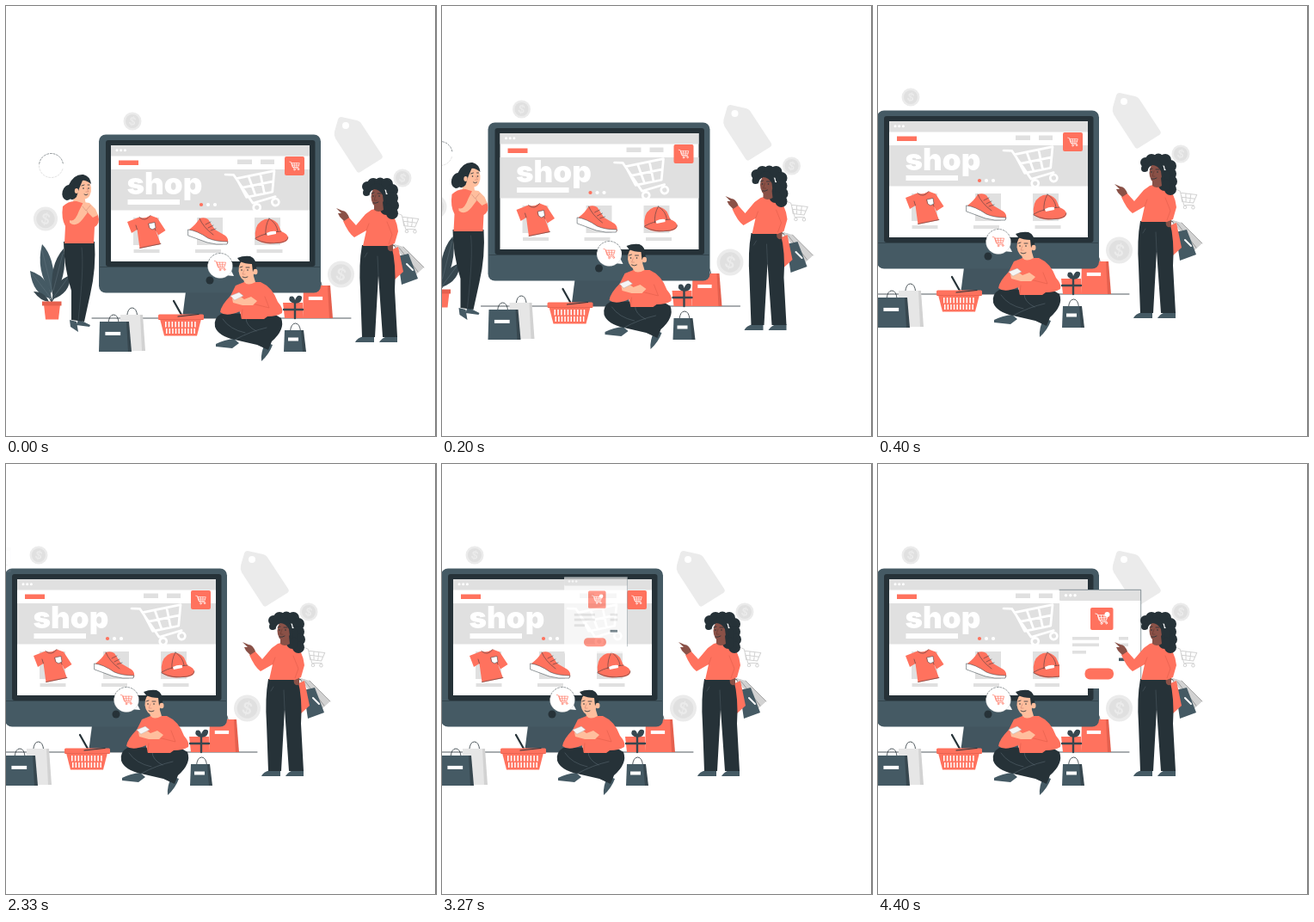
An HTML page with a canvas that plays this animation: 500x500 px, repeating every 8070 ms.

```html
<!DOCTYPE html>
<html lang="en">
<head>
<meta charset="utf-8">
<title>Online shop</title>
<style>
html, body { margin: 0; width: 100%; height: 100%; overflow: hidden; background: #fff; }
canvas { display: block; width: 100vw; height: 100vh; }
</style>
</head>
<body>
<canvas id="stage"></canvas>
<script>
const LOOP = 8070, TICK = 1000 / 15;
const RED = '#ff725e', RED2 = '#e5604e', SLATE = '#455a64', DEEP = '#37474f', INK = '#263238';
const GREY = '#e0e0e0', PALE = '#ebebeb', SKIN = '#ffbe9d', BROWN = '#8a5147', WHITE = '#fff';

const stage = document.getElementById('stage');
const layer = document.createElement('canvas');
const ratio = window.devicePixelRatio || 1;
stage.width = layer.width = 500 * ratio;
stage.height = layer.height = 500 * ratio;
const main = stage.getContext('2d'), over = layer.getContext('2d');
let c = main;

function fill(color, d) {
  c.fillStyle = color;
  c.fill(new Path2D(d));
}
function line(color, width, d) {
  c.strokeStyle = color;
  c.lineWidth = width;
  c.stroke(new Path2D(d));
}
function box(color, x, y, w, h, r = 0) {
  c.fillStyle = color;
  c.beginPath();
  c.roundRect(x, y, w, h, r);
  c.fill();
}
function dot(color, x, y, rx, ry = rx, turn = 0) {
  c.fillStyle = color;
  c.beginPath();
  c.ellipse(x, y, rx, ry, turn, 0, 7);
  c.fill();
}
function at(x, y, size, turn, draw) {
  c.save();
  c.translate(x, y);
  c.rotate(turn);
  c.scale(size, size);
  draw();
  c.restore();
}

function cart(x, y, size, turn, color, width) {
  at(x, y, size, turn, () => {
    line(color, width, 'M-12-10L-8-9L-1.5 6.5L10 5.5M-7-7H12L9 3H-4ZM-5.5-2H10.5M-1-7L.5 3M5-7V3');
    line(color, width, 'M1.7 9A1.7 1.7 0 1 1-1.7 9A1.7 1.7 0 1 1 1.7 9M11.2 8.2A1.7 1.7 0 1 1 7.8 8.2A1.7 1.7 0 1 1 11.2 8.2');
  });
}

function coin(x, y, r) {
  dot(PALE, x, y, r);
  dot(GREY, x, y, r * .76);
  at(x, y, r / 10, .25, () => {
    c.fillStyle = PALE;
    c.font = '600 12px Inter, sans-serif';
    c.textAlign = 'center';
    c.fillText('$', 0, 4.3);
  });
}

function bag(x, y, w, h, color, side, tag) {
  line(INK, .8, `M${x + w * .3} ${y + 1}q1-9 6-9t6 9`);
  fill(color, `M${x + 1} ${y}h${w - 4}l3 ${h}h${-w}z`);
  fill(side, `M${x + w - 5} ${y}h3l3 ${h}h-4z`);
  if (tag) box(WHITE, x + w * .2, y + h * .34, w * .48, 4);
}

function shirt() {
  fill(RED, 'M141 251L155 245.5Q161 248 168 243.5L176 246.5L185.5 261L177 266.5L174 261L180 277L155.5 282L152.5 260L146 264Z');
  line(INK, .5, 'M155 245.5Q162 252 168 243.5M152.5 260L151 255M174 261L172 256M155.5 281.5L180 276.5');
  fill(WHITE, 'M166 253L173 251.5L174 258L170 260L167 258Z');
  line(INK, .5, 'M166 253L173 251.5L174 258L170 260L167 258Z');
}

function shoe() {
  fill(RED, 'M213 260Q221 254 225 247Q231 245 235 248L243 260L255 267Q259 270 258 276L239 275L213 266Z');
  fill(WHITE, 'M212 260Q222 261 235 270Q244 274 258 274L257 277Q244 278 234 275L212 267Z');
  line(INK, .5, 'M212 260Q222 261 235 270Q244 274 258 274L257 277Q244 278 234 275L212 267ZM225 247Q229 257 241 266M232 254L238 251M235 258L241 255M238 261L244 259');
}

function cap() {
  fill(RED, 'M290 271Q288 256 297 250Q307 244 316 253L320 262Q328 265 328 270Q327 276 313 276Q299 278 290 271Z');
  line(INK, .5, 'M290 270Q302 263 320 262M306 247Q301 256 302 266M306 247Q315 253 316 262M290 271Q303 278 320 275Q328 273 328 269');
  fill(WHITE, 'M303 264Q309 261 314 262V265L304 267Z');
}

function monitor() {
  fill('#42555f', 'M209 332H268L273 363H205Z');
  box(SLATE, 108, 149.5, 258, 184, 8);
  box(INK, 116, 156, 243.5, 147, 3);
  box('#34454d', 109, 303, 256, 1);
  box(WHITE, 122, 162, 231, 135);
  dot(INK, 237, 319, 4.5);

  box(GREY, 122, 162, 231, 12.5);
  for (let i = 0; i < 3; i++) dot(WHITE, 129 + i * 4.7, 167.7, 1.5);
  box(RED, 131, 179.5, 23, 5.5);
  box(GREY, 269, 178.5, 17, 5.5);
  box(GREY, 296, 178.5, 16, 5.5);
  box(GREY, 122, 190, 231, 47.5);

  c.fillStyle = WHITE;
  c.textAlign = 'left';
  c.font = '900 35px Inter, sans-serif';
  c.fillText('shop', 140.5, 219);
  box(WHITE, 141.5, 225, 60.5, 6);
  for (let i = 0; i < 3; i++) dot(i ? WHITE : RED, 227 + i * 8, 231, 2.1);
  cart(287.5, 213.5, 2.36, -.2, WHITE, 1.15);
  box(RED, 324, 175, 23, 22, 2);
  cart(335.5, 186, .48, 0, WHITE, 1.4);

  for (const x of [148, 222, 289]) box(GREY, x, 246, 30, 32);
  for (const x of [148.5, 220, 291.5]) box(GREY, x, 283, 30, 4);
  shirt();
  shoe();
  cap();
}

function plant() {
  line(DEEP, 1, 'M53 345Q51 322 42 299M53 345Q58 320 67 286M53 344Q44 328 30 311M53 344Q62 330 74 314');
  fill(SLATE, 'M53 334Q34 308 42 277Q49 284 53 297Q58 314 53 334Z');
  fill(DEEP, 'M54 336Q50 301 67 282Q70 298 66 314Q63 328 54 336Z');
  fill(SLATE, 'M52 340Q31 336 28 308Q41 312 47 322Q52 330 52 340Z');
  fill(DEEP, 'M54 341Q55 320 75 313Q75 334 54 341ZM50 344Q40 343 32 332Q45 332 50 344Z');
  line('#6b7d86', .4, 'M42 284L53 329M66 288L55 331M31 312L51 338M72 316L55 339');
  fill(RED, 'M44 347H63L61 364.5H46Z');
  box(RED2, 42, 343.5, 22.5, 5);
}

function leftWoman() {
  fill(SLATE, 'M74 365L82 367L84 379L75 373ZM84 364L98 371L97 373L82 371Z');
  fill(INK, 'M67 274H103Q105 305 98 335L91 367L76 365L76 331Q67 302 67 274Z');
  line('#4c5b62', .5, 'M88 281Q91 303 84 365');
  fill(SKIN, 'M79 215L91 219L93 232L78 229Z');
  fill(RED, 'M66 233Q73 226 82 227L95 231L107 243Q110 253 103 257L102 276H68L69 256Q64 247 66 233Z');
  fill(SKIN, 'M74 249Q80 252 85 238L90 228L97 229L104 236L107 243L101 246L95 240L89 248Q81 258 74 252Z');
  line('#c98372', .5, 'M89 233L93 238L98 232M94 238L95 241');
  dot(SKIN, 90.5, 212, 8.5, 12.5, -.1);
  dot(INK, 72, 217, 6.5, 9, .25);
  fill(INK, 'M73 208Q79 195 90 196Q98 198 99 207Q92 202 89 203Q85 211 82 222Q78 227 74 224Z');
  dot(SKIN, 82, 215, 2.2, 3);
  line(INK, .8, 'M88 209l3-1M95 208l2 0M91 219q2 2 4 0');
  dot(INK, 90, 212, .8);
  dot(INK, 96, 212, .8);
  line('#c98372', .6, 'M94 212L96 216L93 216');
}

function basket() {
  line(INK, 2.2, 'M195 343L204 359');
  fill(RED, 'M179 364H227L222 383.5H184Z');
  for (let i = 0; i < 10; i++) {
    box(WHITE, 185 + i * 3.8, 367, 1.5, 6.5);
    box(WHITE, 186 + i * 3.6, 375, 1.5, 6);
  }
  box(RED, 177, 358.5, 53, 6.5, 1.5);
  line(RED2, .8, 'M178 364.5H229');
  line(INK, 1.2, 'M200 361L224 358.5');
}

function gift() {
  fill(RED, 'M322 345H345V363H324Z');
  line(DEEP, 2.4, 'M336 345V363M323 353H345');
  fill(DEEP, 'M336 346Q327 344 330 338Q335 336 336 342Q339 334 344 338Q345 345 336 346Z');
}

function man() {
  fill(SLATE, 'M244 393Q254 388 265 387L271 392L263 398L244 396ZM297 413Q296 402 302 391L310 394Q306 405 297 413Z');
  fill(INK, 'M250 358Q241 363 243 373Q247 384 266 388L292 394L305 400L309 390Q325 376 320 363L310 357Z');
  line('#56666e', .6, 'M266 388Q285 378 303 374M279 363Q279 372 291 378M252 364Q260 376 278 380');
  fill(RED, 'M267 325L277 321H296Q310 327 316 344Q323 352 321 357Q315 361 304 361L300 364H274L272 355Q256 362 249 356Q250 348 261 337Z');
  line(RED2, .7, 'M301 338L306 351L286 346M273 337L270 345M274 363L275 353');
  fill(SKIN, 'M275 314L287 311L290 321Q281 326 277 321Z');
  dot(SKIN, 279.5, 307.5, 9, 12.5, -.1);
  fill(INK, 'M269 293Q276 290 284 291Q292 294 291 306L287 309L286 300Q278 300 272 297Z');
  dot(SKIN, 290, 309, 2.5, 3.3);
  line(INK, .8, 'M272 304l3-1M279 304l4 0M275 315q3 2 6 0');
  dot(INK, 274, 307, .8);
  dot(INK, 281, 307, .8);
  line('#c98372', .6, 'M277 307L275 312H278');
  fill(SKIN, 'M263 340L270 336L277 341L285 338L292 343L287 348L275 348L264 345Z');
  fill('#f5f5f5', 'M261 337L271 333L276 337L266 342Z');
  line('#aaa', .4, 'M261 337L271 333L276 337L266 342Z');
}

function bubble(x, y, r, tail) {
  dot(WHITE, x, y, r);
  if (tail) fill(WHITE, 'M254 313L265 314L261 306Z');
  c.setLineDash([2, 1.7]);
  c.strokeStyle = INK;
  c.lineWidth = .5;
  c.beginPath();
  c.arc(x, y, r, 3.3, 6.1);
  c.stroke();
  c.strokeStyle = '#b5b5b5';
  c.lineWidth = .4;
  c.beginPath();
  c.arc(x, y, r, .3, 3.3);
  c.stroke();
  c.setLineDash([]);
}

function rightWoman() {
  line('#555', .6, 'M447 279Q453 274 456 291M448 279Q459 275 465 289M448 276L467 290');
  fill('#d2d2d2', 'M451 277L462 280L486 304L476 313Z');
  line('#777', .6, 'M457 281L479 309M462 280L486 304');
  fill(SLATE, 'M455 291L468 288L479 317L460 324Z');
  fill(RED, 'M447 284L456 280L462 309L452 318Z');
  line(WHITE, 2, 'M466 300L473 307');
  fill(SLATE, 'M406 391Q408 386 416 384H428V391ZM434 391Q437 386 443 384H455V391Z');
  fill(INK, 'M414 278H448Q454 300 452 330L455 385H438L433 313L429 385H414L412 330Q410 300 414 278Z');
  line('#536068', .5, 'M433 313L432 291M417 292L420 287');
  fill(BROWN, 'M443 274H450L450 284Q447 287 444 283Z');
  fill(RED, 'M425 237Q432 234 443 237Q454 244 456 262L452 276L445 279H415L419 261L405 269Q398 264 392 250L398 245L407 255L418 242Z');
  line(RED2, .7, 'M443 251L449 266L445 277M419 261L422 253');
  fill(BROWN, 'M384 235L391 238Q396 238 399 246L393 250L388 245L386 241L390 241Z');
  for (const [x, y, r] of [[420, 210, 6], [427, 207, 7], [435, 206, 6.5], [443, 207, 7], [449, 214, 7], [449, 223, 7], [450, 232, 7], [449, 241, 7], [442, 226, 7], [442, 236, 7], [419, 217, 4]])
    dot(INK, x, y, r);
  fill(BROWN, 'M428 228H438L439 237Q433 241 428 237Z');
  dot(BROWN, 432, 222, 7.5, 11.5);
  fill(INK, 'M422 221Q419 209 431 206Q444 207 442 232Q439 232 438 220Q434 213 428 213Q423 215 422 221Z');
  line(INK, .8, 'M425 218l3-1M432 218l4 0M427 229q3 1 6-1');
  dot(INK, 427, 221, .8);
  dot(INK, 434, 221, .8);
  line('#63382f', .6, 'M430 220L428 226H431');
}

function back() {
  fill(PALE, 'M390 129L408 133Q412 134 414 138L437 173Q439 176 436 178L412 193Q409 195 407 191L383 154Q381 150 382 146L386 132Q387 129 390 129Z');
  dot(WHITE, 395, 139, 4);
  coin(147, 134, 10.5);
  coin(46, 247.5, 14);
  coin(461, 200, 10.5);
  coin(389.5, 312, 15.5);
  cart(467, 253, 1, .12, '#d2d2d2', 1);
  bubble(52.5, 185.5, 14);
  line(INK, .8, 'M100 363H401');
  bag(345, 325, 34, 38, RED, RED2, true);
  monitor();
}

function front() {
  plant();
  leftWoman();
  bag(132, 359, 29, 42, '#e6e6e6', '#d2d2d2', false);
  bag(108, 367, 37, 35, SLATE, DEEP, true);
  basket();
  gift();
  bag(323, 377, 25, 25, SLATE, DEEP, true);
  man();
  bubble(249, 302, 14.5, true);
  cart(249, 302, .55, 0, RED, 1.2);
  rightWoman();
}

function panel() {
  box(WHITE, 0, 0, 95, 115, 1);
  box(GREY, 0, 0, 95, 13, 1);
  line(SLATE, .6, 'M0 .3H94.7V104');
  for (let i = 0; i < 3; i++) dot(WHITE, 7.5 + i * 5.3, 6.7, 1.7);
  box(RED, 36, 21, 26.5, 26, 2);
  cart(49, 34, .6, 0, WHITE, 1.4);
  dot(WHITE, 55.5, 29, 3);
  for (const [y, w] of [[55, 31], [62.5, 31], [71, 16]]) box(GREY, 15, y, w, 3.6);
  box(GREY, 69, 55, 11, 3.6);
  box(GREY, 69, 62.5, 11, 3.6);
  box(SLATE, 69, 79.5, 11, 3.6);
  box(RED, 29.5, 91.5, 33.5, 13, 6);
}

function reset(ctx) {
  c = ctx;
  c.setTransform(ratio, 0, 0, ratio, 0, 0);
  c.clearRect(0, 0, 500, 500);
  c.lineCap = c.lineJoin = 'round';
}

function popup(u) {
  const left = (1 - u) ** 2;
  reset(over);
  at(211 - 244 * left, 146 - 52 * left, 1 - .8 * left, 0, panel);
  c = main;
  c.globalAlpha = 1 - left;
  c.drawImage(layer, 0, 0, 500, 500);
  c.globalAlpha = 1;
}

function render(tick) {
  const pan = Math.min(tick / 6, 1), slide = Math.min((tick - 34) / 32, 1);
  const x = -109 * pan, y = -28 * pan;
  reset(main);
  box(WHITE, 0, 0, 500, 500);
  at(x, y, 1, 0, back);
  if (slide > 0) popup(slide);
  at(x, y, 1, 0, front);
  box('#777', 499, 0, 1, 500);
}

const start = performance.now();
let last = -1;
function frame() {
  const t = (performance.now() - start) % LOOP;
  const tick = Math.floor(t / TICK + .06);
  if (tick !== last) render(last = tick);
  requestAnimationFrame(frame);
}
frame();
</script>
</body>
</html>
```
